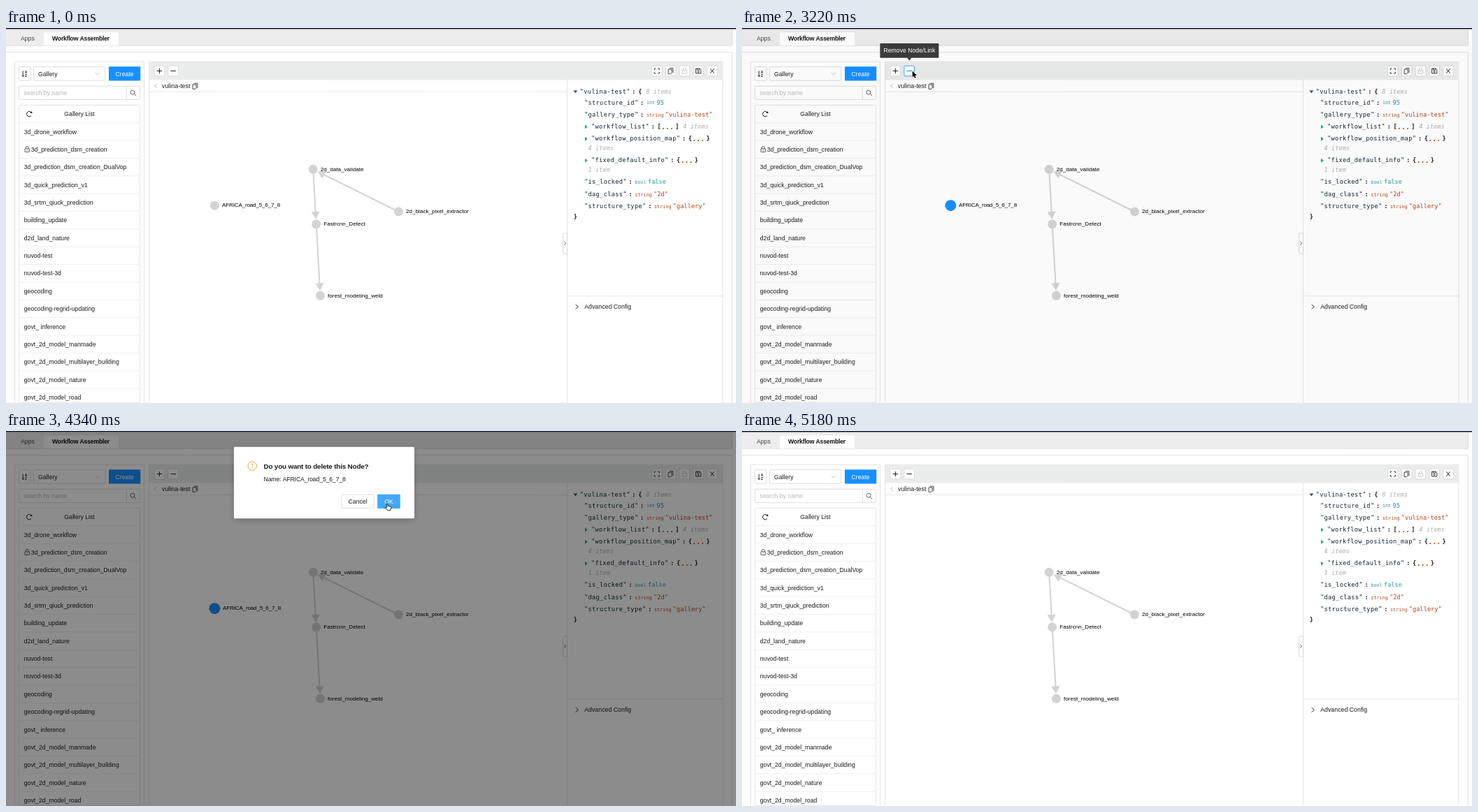
Animation, 1044 px wide and 537 px high, one loop 6160 ms. Source, as an HTML page with a canvas:

```html
<!DOCTYPE html>
<html lang="en">
<head>
<meta charset="utf-8">
<title>Workflow Assembler</title>
<style>
html, body { margin: 0; width: 100%; height: 100%; overflow: hidden; background: #fff; }
canvas { display: block; width: 1044px; height: 537px; }
</style>
</head>
<body>
<canvas id="stage"></canvas>
<script>
const W = 1044, H = 537, LOOP = 6160, STEP = 70;
const SANS = '"Liberation Sans", Arial, sans-serif';
const MONO = '"DejaVu Sans Mono", monospace';
const INK = '#1c1c1c', BLUE = '#1890ff', LINE = '#dedede', NODE = '#d3d3d3';
const canvas = document.getElementById('stage');
const ratio = window.devicePixelRatio || 1;
canvas.width = W * ratio;
canvas.height = H * ratio;
const c = canvas.getContext('2d');

const clamp = v => Math.max(0, Math.min(1, v));

// y is the middle of the capital letters
function text(s, x, y, o = {}) {
  const size = o.size || 8.68;
  c.font = `${o.style || ''} ${size}px ${o.family || SANS}`;
  c.letterSpacing = (o.gap || 0) + 'px';
  c.textAlign = o.align || 'left';
  c.fillStyle = o.color || INK;
  c.fillText(s, x, y + size * 0.35);
  c.letterSpacing = '0px';
}

function box(x, y, w, h, fill, stroke, r = 0) {
  c.beginPath();
  c.roundRect(x, y, w, h, r);
  if (fill) { c.fillStyle = fill; c.fill(); }
  if (stroke) { c.strokeStyle = stroke; c.lineWidth = 0.8; c.stroke(); }
}

function path(points, color, width = 1, close = false) {
  c.beginPath();
  points.forEach(([x, y], i) => i ? c.lineTo(x, y) : c.moveTo(x, y));
  if (close) c.closePath();
  c.strokeStyle = color;
  c.lineWidth = width;
  c.stroke();
}

function poly(points, fill) {
  c.beginPath();
  points.forEach(([x, y]) => c.lineTo(x, y));
  c.closePath();
  c.fillStyle = fill;
  c.fill();
}

function disc(x, y, r, fill) {
  c.beginPath();
  c.arc(x, y, r, 0, 7);
  c.fillStyle = fill;
  c.fill();
}

function arc(x, y, r, from, to, color, width = 1) {
  c.beginPath();
  c.arc(x, y, r, from, to);
  c.strokeStyle = color;
  c.lineWidth = width;
  c.stroke();
}

const hline = (x1, x2, y, color = LINE) => path([[x1, y], [x2, y]], color, 0.8);
const vline = (x, y1, y2, color = LINE) => path([[x, y1], [x, y2]], color, 0.8);

function copyIcon(x, y) {
  path([[x - 1.5, y - 4], [x + 3.5, y - 4], [x + 3.5, y + 3]], '#333', 0.9);
  path([[x - 3.3, y - 2.3], [x + 1.7, y - 2.3], [x + 1.7, y + 2.6], [x + 0.2, y + 4.2], [x - 3.3, y + 4.2]], '#333', 0.9, true);
}

function lockIcon(x, y, color) {
  box(x - 3.3, y - 0.8, 6.6, 4.6, null, color, 0.5);
  path([[x - 2, y - 0.8], [x - 2, y - 3.2], [x - 1, y - 4], [x + 1, y - 4], [x + 2, y - 3.2], [x + 2, y - 0.8]], color, 0.8);
  path([[x, y + 0.7], [x, y + 2]], color, 0.8);
}

function drawHeader() {
  box(0, 2, 1038, 23, '#ededed');
  hline(0, 1038.5, 25.3, '#d8d8d8');
  vline(1038.4, 2, 25.3, '#d0d0d0');
  box(54, 6.3, 107, 18.6, '#fff', null, [2, 2, 0, 0]);
  text('Apps', 21, 15.3, { color: '#444' });
  text('Workflow Assembler', 66, 15.3, { style: 'bold', gap: -0.2, color: '#111' });
  hline(0, 1038.4, 34.7, '#d8d8d8');
  vline(1038.4, 34.7, H, '#d8d8d8');
}

const ITEMS = ['3d_drone_workflow', '3d_prediction_dsm_creation', '3d_prediction_dsm_creation_DualVop',
  '3d_quick_prediction_v1', '3d_srtm_qiuck_prediction', 'building_update', 'd2d_land_nature',
  'nuvod-test', 'nuvod-test-3d', 'geocoding', 'geocoding-regrid-updating', 'govt_ inference',
  'govt_2d_model_manmade', 'govt_2d_model_multilayer_building', 'govt_2d_model_nature', 'govt_2d_model_road'];

function drawSidebar() {
  box(12.5, 48.3, 185, 500, '#fff', LINE);
  box(18.4, 55.6, 16.6, 19.6, '#fff', '#d5d5d5', 1);
  path([[24.3, 61.5], [24.3, 69.5]], INK, 0.9);
  path([[22.6, 67.7], [24.3, 69.6], [26, 67.7]], INK, 0.9);
  text('A', 26.8, 63, { size: 5, style: 'bold' });
  text('Z', 27, 68, { size: 5, style: 'bold' });
  box(39.4, 55.6, 102.4, 19.6, '#fff', '#d5d5d5', 1);
  text('Gallery', 46, 65.8);
  path([[128, 64], [131, 67.4], [134, 64]], '#b5b5b5', 0.8);
  box(147, 55.3, 45.3, 20.2, BLUE, null, 1);
  text('Create', 169.6, 65.6, { align: 'center', color: '#fff' });
  box(18.4, 83.2, 173.2, 19.4, '#fff', '#d5d5d5', 1);
  vline(172.3, 83.2, 102.6, '#d5d5d5');
  text('search by name', 25.3, 92.8, { color: '#b8b8b8' });
  arc(181, 92.2, 3, 0, 7, '#555', 0.9);
  path([[183.2, 94.4], [186, 97.2]], '#555', 1);

  box(18.4, 110.4, 173.2, 425.8, '#fff', LINE, 1);
  arc(33.2, 123.2, 3.7, 0.7, 5.6, INK, 1);
  poly([[34.4, 121.9], [37.6, 122], [37, 119]], INK);
  text('Gallery List', 105, 123.3, { align: 'center' });
  ITEMS.forEach((name, i) => {
    const y = 148.5 + i * 25.37;
    hline(18.4, 191.6, y - 12.8, '#ececec');
    if (i === 1) lockIcon(30.3, y - 0.2, '#333');
    text(name, i === 1 ? 35.7 : 25.8, y);
  });
}

function toolButton(x, y, border = '#d5d5d5') {
  box(x - 7.3, y - 7.3, 14.6, 14.6, '#fff', border, 1);
}

function drawToolbar(hover) {
  box(204.6, 48.3, 820.4, 500, '#fff', LINE);
  box(205, 48.6, 819.8, 25, '#ebeded');
  hline(205, 1025, 73.9, '#e4e4e4');
  [219.4, 239.2].forEach((x, i) => {
    const on = hover && i === 1, ink = on ? BLUE : INK;
    toolButton(x, 61.5, on ? BLUE : '#d5d5d5');
    path([[x - 3.7, 61.5], [x + 3.7, 61.5]], ink, 1);
    if (!i) path([[x, 57.8], [x, 65.2]], ink, 1);
  });
  const y = 61.5;
  [930.8, 950.6, 970.4, 990.2, 1010].forEach(x => toolButton(x, y));
  for (const [sx, sy] of [[1, 1], [1, -1], [-1, 1], [-1, -1]]) {
    const x = 930.8;
    path([[x + sx * 1.4, y + sy * 3.5], [x + sx * 3.5, y + sy * 3.5], [x + sx * 3.5, y + sy * 1.4]], INK, 0.9);
  }
  copyIcon(950.4, y);
  lockIcon(970.4, y, '#bdbdbd');
  path([[986.6, 58], [992.2, 58], [993.8, 59.6], [993.8, 65], [986.6, 65]], INK, 0.9, true);
  path([[988.5, 58], [988.5, 60.2], [991.6, 60.2], [991.6, 58]], INK, 0.8);
  arc(990.2, 62.6, 1.1, 0, 7, INK, 0.8);
  path([[1007.3, 58.3], [1012.7, 64.7]], INK, 1);
  path([[1012.7, 58.3], [1007.3, 64.7]], INK, 1);

  path([[216, 79.8], [212.4, 82.8], [216, 85.8]], '#b5b5b5', 0.8);
  text('vulina-test', 223, 83, { size: 8.9 });
  copyIcon(270.4, 83.2);
  hline(205, 802.5, 91.4, '#e4e4e4');
}

function drawJson() {
  const mono = (s, x, y, o) => text(s, x, y, { family: MONO, ...o });
  const key = (s, x, y) => {
    mono(`"${s}"`, x, y, { gap: 0.31, color: '#12252b' });
    const end = x + (s.length + 2) * 5.535;
    mono(':', end + 2.6, y, { style: 'bold' });
    return end + 11.4;
  };
  const count = (n, x, y) => mono(n, x, y, { style: 'italic', color: '#b0b0b0' });
  const leaf = (name, type, value, y, color) => {
    const x = key(name, 827, y);
    mono(type, x, y + 0.6, { size: 6.82, color });
    mono(value, x + type.length * 4.105 + 2.2, y, { color });
  };
  const branch = (name, open, close, y) => {
    poly([[828, y - 2.6], [831.8, y + 0.4], [828, y + 3.4]], '#2aa198');
    const x = key(name, 837, y);
    mono(open, x, y, { style: 'bold' });
    mono('...', x + 5.6, y, { style: 'bold', size: 10, color: '#cb4b16' });
    mono(close, x + 25.7, y, { style: 'bold' });
    return x;
  };
  const RED = '#b8431c', BLU = '#2a87b8', TEAL = '#2aa198';
  poly([[811.4, 89.6], [817.4, 89.6], [814.4, 93.2]], '#3d4b50');
  mono('{', key('vulina-test', 820.8, 91), 91, { style: 'bold' });
  count('8 items', 915.3, 91);
  leaf('structure_id', 'int', '95', 106.5, BLU);
  leaf('gallery_type', 'string', '"vulina-test"', 123.8, RED);
  count('4 items', branch('workflow_list', '[', ']', 141) + 36.8, 141);
  branch('workflow_position_map', '{', '}', 158.4);
  count('4 items', 832.6, 172);
  branch('fixed_default_info', '{', '}', 189.4);
  count('1 item', 832.6, 203);
  leaf('is_locked', 'bool', 'false', 220.2, TEAL);
  leaf('dag_class', 'string', '"2d"', 237.6, RED);
  leaf('structure_type', 'string', '"gallery"', 254.8, RED);
  mono('}', 811.8, 270.4, { style: 'bold' });
}

function drawSide() {
  vline(802.5, 74, H);
  hline(802.5, 1025, 383.8);
  box(796.5, 293.8, 6, 29.4, '#fff', '#cfcfcf', [3, 0, 0, 3]);
  path([[798.2, 306], [800.8, 308.3], [798.2, 310.6]], '#555', 0.9);
  path([[814.6, 396], [818.4, 399.3], [814.6, 402.6]], INK, 0.9);
  text('Advanced Config', 827.2, 398.8, { size: 8.8 });
  drawJson();
}

function link(x1, y1, x2, y2) {
  const a = Math.atan2(y2 - y1, x2 - x1);
  const at = (d, side) => [x2 - d * Math.cos(a) - side * Math.sin(a), y2 - d * Math.sin(a) + side * Math.cos(a)];
  path([[x1, y1], at(12, 0)], NODE, 2);
  poly([at(7, 0), at(18, 6), at(18, -6)], NODE);
}

function drawGraph(t) {
  link(439.2, 202.3, 443.7, 280.9);
  link(443.7, 280.9, 449.5, 383.3);
  link(561.5, 263, 439.2, 202.3);
  const label = (s, x, y) => text(s, x, y, { size: 8.1, color: '#000' });
  [['2d_data_validate', 439.2, 202.3], ['2d_black_pixel_extractor', 561.5, 263],
    ['Fastrcnn_Detect', 443.7, 280.9], ['forest_modeling_weld', 449.5, 383.3]].forEach(([s, x, y]) => {
    disc(x, y, 6.5, NODE);
    label(s, x + 10.6, y - 0.5);
  });
  if (t >= 4480) return;
  const picked = t >= 1680, hot = t >= 1190 && t < 1960;
  disc(298.4, 254.2, picked ? 8 : 6.5, picked ? BLUE : NODE);
  text('AFRICA_road_5_6_7_8', picked ? 310 : 309, 253.6,
    hot ? { size: 9.2, style: 'bold', color: '#000' } : { size: 8.1, gap: -0.18, color: '#000' });
}

function drawTooltip(alpha) {
  if (alpha <= 0) return;
  c.save();
  c.globalAlpha = alpha;
  const fill = '#3b3b3b';
  box(197.4, 22, 84, 20.8, fill, null, 1.2);
  poly([[235.8, 42.6], [242.8, 42.6], [239.3, 46.6]], fill);
  text('Remove Node/Link', 239.4, 32.4, { align: 'center', color: '#fff' });
  c.restore();
}

// p runs from 0 (hidden) to 1 (open); the panel grows out of the clicked button
function drawDialog(p) {
  if (p <= 0) return;
  const s = 0.2 + 0.8 * p, ox = 243.6, oy = 60;
  c.save();
  c.globalAlpha = p;
  c.translate(ox, oy);
  c.scale(s, s);
  c.translate(-ox, -oy);
  c.save();
  c.shadowColor = 'rgba(0,0,0,0.2)';
  c.shadowBlur = 9 * ratio;
  c.shadowOffsetY = 2.5 * ratio;
  box(326, 22.8, 258, 102.5, '#fff', null, 1.2);
  c.restore();
  arc(352.2, 50, 6.2, 0, 7, '#e8a33d', 1);
  path([[352.2, 46.4], [352.2, 51.2]], '#e8a33d', 1);
  disc(352.2, 53, 0.7, '#e8a33d');
  text('Do you want to delete this Node?', 368.5, 50.3, { size: 9.92, style: 'bold', gap: -0.2 });
  text('Name: AFRICA_road_5_6_7_8', 368.5, 69.3, { gap: -0.13 });
  box(480, 91, 46.2, 19.6, '#fff', '#d5d5d5', 1);
  text('Cancel', 503.1, 100.8, { align: 'center' });
  box(531.2, 90.7, 32.6, 20.2, '#40a9ff', null, 1);
  text('OK', 547.5, 100.8, { align: 'center', color: '#fff' });
  c.restore();
}

// time, x, y of the pointer tip
const TRACK = [[210, 514, 526], [350, 440, 420], [490, 340, 300], [630, 288, 239], [770, 294.5, 253.5],
  [910, 294.5, 253.5], [1050, 297.5, 253], [1890, 297.5, 253], [2100, 288, 205], [2310, 270, 125],
  [2520, 263, 91], [2590, 260, 86], [2800, 243.7, 61.5], [3500, 243.7, 61.5], [3780, 566, 133],
  [3850, 565, 130], [4130, 550, 110], [4340, 545.5, 104], [4690, 545.5, 104], [4830, 548, 125], [5040, 552, 171]];

function pointerAt(t) {
  if (t < 210 || t >= 5180) return null;
  if (t >= 5110) return [552, 410];
  const i = TRACK.findIndex(k => k[0] > t);
  if (i < 0) return [552, 171];
  const [t0, x0, y0] = TRACK[i - 1], [t1, x1, y1] = TRACK[i];
  const f = (t - t0) / (t1 - t0);
  return [x0 + (x1 - x0) * f, y0 + (y1 - y0) * f];
}

function drawPointer(t) {
  const at = pointerAt(t);
  if (!at) return;
  const hand = (t >= 1190 && t < 1960) || (t >= 4130 && t < 4760);
  const shape = hand
    ? [[-1, 0], [0.4, 0], [0.9, 3.4], [4.6, 4.2], [5.3, 5.3], [4.4, 9.6], [0.2, 9.6], [-3.2, 5.6], [-2.4, 4.7], [-0.8, 5.8]]
    : [[0, 0], [0, 9], [2, 7.2], [3.4, 10.2], [5, 9.5], [3.7, 6.6], [6.4, 6.4]];
  c.save();
  c.translate(...at);
  c.lineJoin = 'round';
  if (hand) {
    poly(shape, '#fff');
    path(shape, '#111', 0.9, true);
  } else {
    path(shape, '#fff', 1.4, true);
    poly(shape, '#000');
  }
  c.restore();
}

function bezier(x1, y1, x2, y2) {
  const f = (a, b, u) => 3 * u * (1 - u) ** 2 * a + 3 * u * u * (1 - u) * b + u ** 3;
  return x => {
    let lo = 0, hi = 1;
    for (let i = 0; i < 24; i++) {
      const mid = (lo + hi) / 2;
      if (f(x1, x2, mid) < x) lo = mid; else hi = mid;
    }
    return f(y1, y2, lo);
  };
}
const easeOutCirc = bezier(0.08, 0.82, 0.17, 1);
const easeInCirc = bezier(0.6, 0.04, 0.98, 0.34);

function dialogProgress(t) {
  if (t < 3276 || t >= 4763) return 0;
  return t < 4400 ? easeOutCirc(clamp((t - 3276) / 384)) : 1 - easeInCirc(clamp((t - 4480) / 283));
}

function maskAlpha(t) {
  return 0.45 * (t < 4400 ? clamp((t - 3205) / 350) : 1 - clamp((t - 4480) / 370));
}

function draw(t) {
  c.setTransform(ratio, 0, 0, ratio, 0, 0);
  box(0, 0, W, H, '#fff');
  drawHeader();
  drawSidebar();
  drawToolbar(t >= 2800 && t < 3430);
  drawSide();
  drawGraph(t);
  box(0, 1.6, W, H, `rgba(0,0,0,${maskAlpha(t)})`);
  box(0, 0, W, 1.6, '#071327');
  drawDialog(dialogProgress(t));
  drawTooltip(Math.min(clamp((t - 2800) / 210), clamp((3500 - t) / 100)));
  drawPointer(t);
}

function frame() {
  const t = performance.now() % LOOP;
  draw(Math.floor(t / STEP) * STEP);
  requestAnimationFrame(frame);
}
frame();
</script>
</body>
</html>
```
